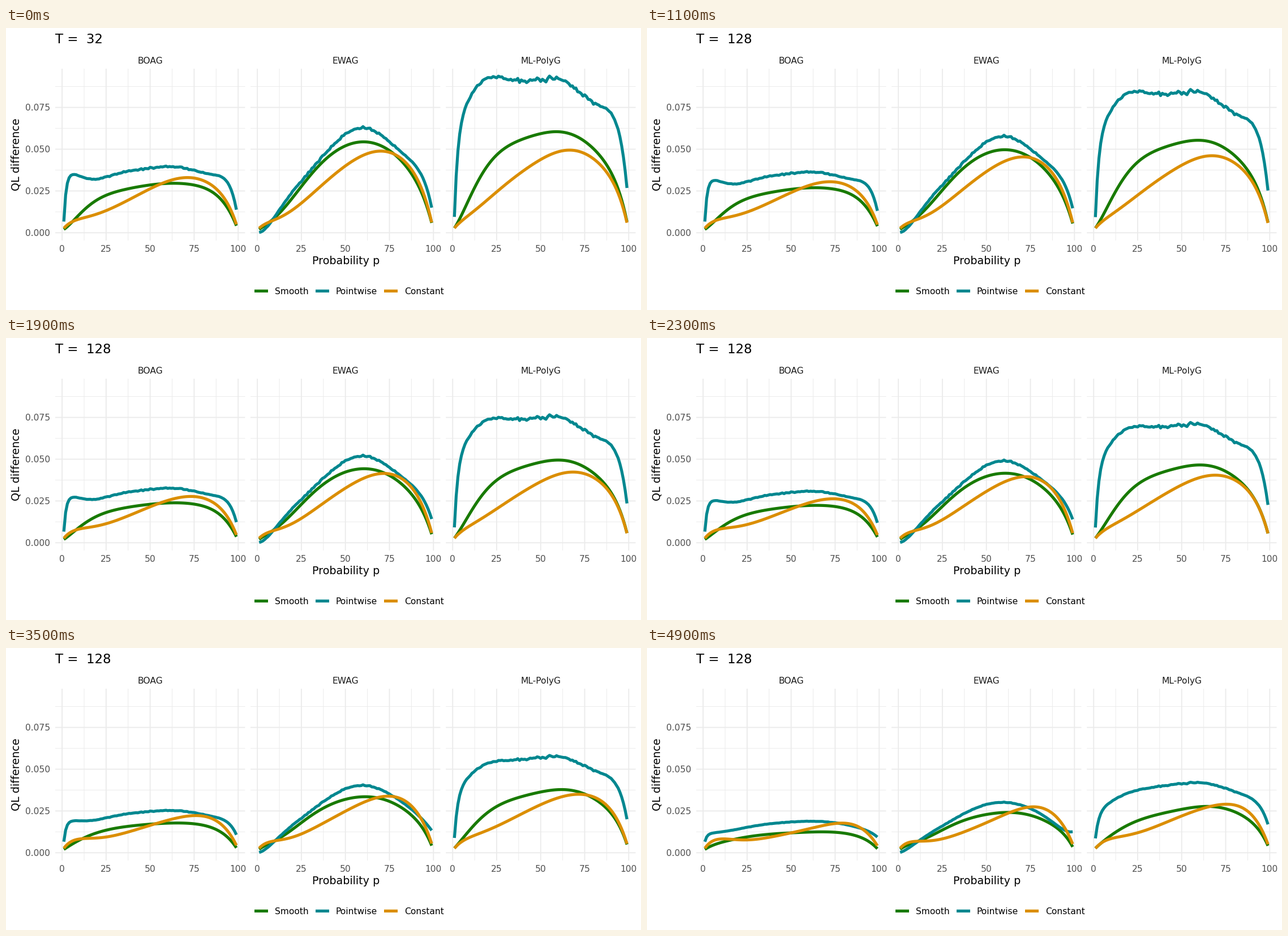
Write a matplotlib script that moves like this. It is 1122 by 499 pixels and loops after 8000 ms.

```python
import numpy as np
import matplotlib.pyplot as plt
from matplotlib.animation import FuncAnimation
from numpy.polynomial import Chebyshev

W, H, DPI = 1122, 499, 100
STEPS, HOLD, FRAMES = 45, 4, 80
GREEN, TEAL, ORANGE = "#187A00", "#00878F", "#DB8E00"
GRID = "#EBEBEB"
PANEL_W, PANEL_GAP, TOP, BOTTOM = 335.4, 345.05, 72, 376.1
LINE = 5.2

plt.rcParams["font.family"] = "DejaVu Sans"
rng = np.random.default_rng(7)

P = np.arange(1, 100)
# Chebyshev nodes crowd towards both ends, where the curves bend most.
NODES = 50 - 49 * np.cos(np.pi * np.arange(9) / 8)


def curve(*values):
    """Polynomial through values (thousandths) at NODES, sampled at P."""
    return Chebyshev.fit(NODES, values, len(NODES) - 1)(P)


def jagged(ends, drops, tau, amp):
    """Add a steep initial rise and a wobble that shrinks as the curve falls."""
    rise = np.exp(-(P - 1) / tau)
    wobble = amp * rng.normal(size=P.size) * np.sin(np.pi * P / 100)
    return [end - drop * rise + wobble * k
            for end, drop, k in zip(ends, drops, (1, 0.25))]


# Each series is a (start, end) pair: smooth, pointwise, constant.
PANELS = {
    "BOAG": (
        (curve(2, 5.4, 16.3, 24.7, 28.6, 29.4, 24.8, 12.5, 4.2),
         curve(2, 4.1, 7.5, 10.4, 11.9, 12.5, 10.8, 5.9, 2.4)),
        jagged((curve(31.7, 35.2, 32.3, 35.4, 38.6, 38.9, 35, 27.6, 13.8),
                curve(11.2, 11.8, 13.3, 16.4, 18.4, 18.6, 16, 12.1, 9.4)),
               drops=(25, 4.6), tau=1.2, amp=0.28),
        (curve(2.7, 6, 9.8, 16.2, 26.3, 32.9, 28.7, 14.9, 5),
         curve(2.7, 6.6, 8.1, 8.2, 11.9, 16.4, 17, 9.6, 4.2))),
    "EWAG": (
        (curve(2, 4.7, 15, 35.8, 52, 52.7, 39.5, 18.7, 5.9),
         curve(2.1, 4.3, 8.6, 16.8, 22.9, 23.7, 18.4, 9.5, 3.5)),
        jagged((curve(0.2, 2.6, 18, 38.7, 59, 59.6, 45.6, 29.5, 15),
                curve(0.2, 2.1, 9.8, 19.9, 28.9, 28.8, 20.6, 13.1, 12.6)),
               drops=(0, 0), tau=1, amp=0.4),
        (curve(2.7, 5.4, 10.6, 23.4, 40, 48.8, 41.6, 20.7, 6.2),
         curve(2.7, 5.7, 7, 10.2, 18, 26.1, 25.5, 13.5, 5.2))),
    "ML-PolyG": (
        (curve(2.8, 9.9, 32.7, 51.7, 59.3, 58.4, 44.8, 22.2, 6.6),
         curve(2.7, 6.2, 14.2, 21.4, 26, 27.5, 22.1, 11.5, 4.2)),
        jagged((curve(71, 73.6, 89.5, 92.2, 92.2, 87, 75.6, 56, 26.8),
                curve(25.6, 27.5, 33.9, 38.8, 41.5, 40.5, 34.9, 26.2, 17)),
               drops=(61.5, 17), tau=2, amp=0.75),
        (curve(2.8, 6.7, 15.8, 29.9, 43.8, 49.3, 39.8, 20, 6),
         curve(2.6, 6.1, 9.7, 14.1, 22, 28.3, 26.8, 14.2, 5.1))),
}


def to_x(p, panel):
    return 99.1 + PANEL_GAP * panel + 3.111 * p


def to_y(v):
    return 362.3 - 2.957 * v


fig = plt.figure(figsize=(W / DPI, H / DPI), dpi=DPI, facecolor="white")
ax = fig.add_axes([0, 0, 1, 1])
ax.set(xlim=(0, W), ylim=(H, 0))
ax.axis("off")


def stroke(x, y, color, px, z):
    return ax.plot(x, y, color=color, lw=px * 72 / DPI, zorder=z, snap=False,
                   solid_capstyle="butt", solid_joinstyle="round")[0]


def label(x, y, s, size=11.2, color="black", ha="center", **kw):
    return ax.text(x, y, s, fontsize=size, color=color, ha=ha, va="baseline", **kw)


def grid(left, panel, xs, ys, px, z):
    for v in ys:
        stroke([left, left + PANEL_W], [to_y(v)] * 2, GRID, px, z)
    for p in xs:
        stroke([to_x(p, panel)] * 2, [TOP, BOTTOM], GRID, px, z)


major, minor = np.arange(0, 101, 25), np.arange(12.5, 100, 25)
curves = []
for i, (name, series) in enumerate(PANELS.items()):
    left = 87 + PANEL_GAP * i
    grid(left, i, minor, minor, 0.94, 1)
    grid(left, i, major, major[:-1], 1.89, 2)
    for p in major:
        label(to_x(p, i), 396, str(p), color="#4D4D4D")
    label(left + PANEL_W / 2, 63, name, color="#1A1A1A")
    for z, (ends, color) in enumerate(zip(series, (GREEN, TEAL, ORANGE)), 3):
        curves.append((stroke(to_x(P, i), to_y(ends[0]), color, LINE, z), ends))

for v in major[:-1]:
    label(78.2, to_y(v) + 5.7, f"{v / 1000:.3f}", color="#4D4D4D", ha="right")

label(600.6, 418, "Probability p", 13.8)
label(23.3, 224, "QL difference", 13.8, rotation=90, rotation_mode="anchor")
title = label(87, 27, "", 16.5, ha="left")

for x, name, color in ((439, "Smooth", GREEN), (547, "Pointwise", TEAL),
                       (668, "Constant", ORANGE)):
    stroke([x, x + 24], [465.4] * 2, color, LINE, 3)
    label(x + 36, 471, name, ha="left")


def update(frame):
    step = min(max(frame - HOLD, 0), STEPS)
    t = step / STEPS
    title.set_text(f"T =  {128 if step else 32}")
    for line, (start, end) in curves:
        line.set_ydata(to_y(start + (end - start) * t))
    return [title] + [line for line, _ in curves]


anim = FuncAnimation(fig, update, frames=FRAMES, interval=100, repeat=True, repeat_delay=0)
plt.show()
```
